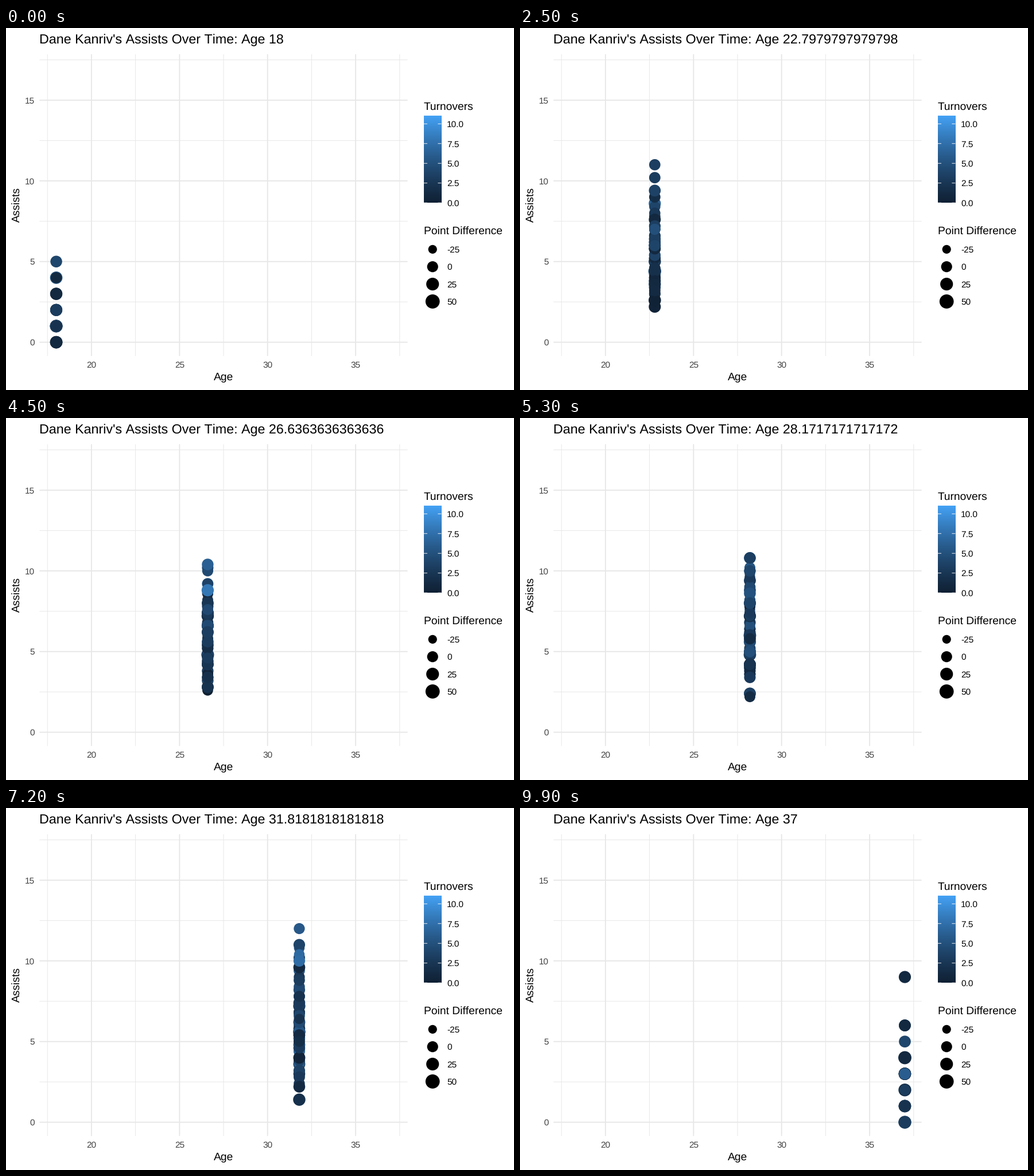
A matplotlib script for the animation above (10 s loop, 885x632 px).

```python
import numpy as np
import matplotlib.pyplot as plt
from matplotlib.animation import FuncAnimation

plt.rcParams.update({
    "font.family": "Liberation Sans",
    "text.hinting": "none",
    "text.kerning_factor": 6,
})

W, H, DPI = 885, 632, 100
PT = 72 / DPI
FRAMES, STEP = 100, 100
FIRST, LAST = 18, 37
LEFT, RIGHT, TOP, BOTTOM = 58.4, 699.6, 45.7, 572.6
BAR_L, BAR_R, BAR_T, BAR_B = 728, 758.4, 153.5, 305.2
GRID, TICK_TEXT = "#e7e7e7", "#424242"
LOW, HIGH = (19, 43, 67), (86, 177, 247)
GAMMA = 1.8

# Games per season; mean and best assists run between a few key ages
GAMES = [71, 79, 50, 66, 68, 80, 82, 65, 66, 80,
         77, 82, 82, 73, 82, 58, 78, 6, 35, 66]
AGES = np.arange(FIRST, LAST + 1)
KNOTS = [18, 20, 21, 24, 34, 36, 37]
MEANS = np.interp(AGES, KNOTS, [1.5, 3.8, 5.2, 5.8, 5.5, 5.6, 2.2])
BESTS = np.interp(AGES, KNOTS, [5, 8, 12, 12, 13, 17, 9]).astype(int)
KEYS = [round(k * (FRAMES - 1) / (LAST - FIRST)) for k in range(len(AGES))]


def px(age):
    return 148.9 + 30.68 * (np.asarray(age) - 20)


def py(assists):
    return 548.6 - 28.17 * np.asarray(assists)


def diameter(diff):
    share = np.clip((np.asarray(diff, float) + 48) / 100, 0, 1)
    return 6.2 + 18.7 * np.sqrt(share)


# --- colour ramp, blended in CIE Lab ---------------------------------------
TO_XYZ = np.array([[0.4124, 0.3576, 0.1805],
                   [0.2126, 0.7152, 0.0722],
                   [0.0193, 0.1192, 0.9505]])
WHITE = TO_XYZ.sum(axis=1)
TO_LAB = np.array([[0, 116, 0], [500, -500, 0], [0, 200, -200]])


def to_lab(rgb):
    c = np.array(rgb) / 255
    lin = np.where(c > 0.04045, ((c + 0.055) / 1.055) ** 2.4, c / 12.92)
    f = TO_XYZ @ lin / WHITE
    f = np.where(f > 0.008856, np.cbrt(f), 7.787 * f + 16 / 116)
    return TO_LAB @ f - [16, 0, 0]


def to_rgb(lab):
    fy = (lab[:, 0] + 16) / 116
    f = np.stack([fy + lab[:, 1] / 500, fy, fy - lab[:, 2] / 200], axis=1)
    xyz = np.where(f > 0.2069, f ** 3, (f - 16 / 116) / 7.787) * WHITE
    lin = np.clip(xyz @ np.linalg.inv(TO_XYZ).T, 0, 1)
    return lin ** (1 / GAMMA)


LAB_LOW, LAB_HIGH = to_lab(LOW), to_lab(HIGH)


def shade(turnovers):
    t = np.asarray(turnovers, float)[:, None] / 11
    return to_rgb(LAB_LOW + t * (LAB_HIGH - LAB_LOW))


# --- game data --------------------------------------------------------------
rng = np.random.default_rng(24)


def season(n, mean, best):
    """Rows of assists, turnovers and dot size for one age."""
    spread = np.sqrt(mean)
    low = max(0, round(mean - 2.1 * spread))
    high = min(best, int(mean + 3 * spread))
    usual = np.minimum(rng.poisson(mean, n), high)
    # one best game and at least one of every usual score
    assists = rng.permutation(np.r_[best, low:high + 1, usual][:n])
    turnovers = np.minimum(rng.poisson(1.2 + 0.28 * assists), 11)
    size = diameter(rng.normal(5, 9, n))
    return np.stack([assists, turnovers, size], axis=1)


data = [season(*args) for args in zip(GAMES, MEANS, BESTS)]


def state(i):
    """Ages and rows at step i; games without a partner wait in place."""
    k = np.searchsorted(KEYS, i, side="right") - 1
    a, age = data[k], AGES[k]
    if KEYS[k] == i:
        return np.full(len(a), age), a
    b = data[k + 1]
    t = (i - KEYS[k]) / (KEYS[k + 1] - KEYS[k])
    n = min(len(a), len(b))
    moved = a[:n] * (1 - t) + b[:n] * t
    ages = np.where(np.arange(len(a)) < n, age + t, age)
    return ages, np.vstack([moved, a[n:]])


# --- stage --------------------------------------------------------------------
fig = plt.figure(figsize=(W / 100, H / 100), dpi=DPI, facecolor="white")
ax = fig.add_axes([0, 0, 1, 1])
ax.axis("off")


def label(x, y, text, size, color="black", **kw):
    return ax.text(x, y, text, fontsize=size * PT, color=color,
                   va="baseline", **kw)


def line(xs, ys, width, color=GRID, z=1):
    ax.plot(xs, ys, color=color, lw=width * PT, solid_capstyle="butt",
            snap=False, zorder=z)


def grid(ages, assists, width):
    for y in py(assists):
        line([LEFT, RIGHT], [y, y], width)
    for x in px(ages):
        line([x, x], [TOP, BOTTOM], width)


grid(np.arange(17.5, 38, 5), np.arange(2.5, 18, 5), 0.95)
grid(np.arange(20, 36, 5), np.arange(0, 16, 5), 1.9)

for age in range(20, 36, 5):
    label(px(age), 592.6, str(age), 15.45, TICK_TEXT, ha="center")
for n in range(0, 16, 5):
    label(49.6, py(n) + 5.6, str(n), 15.45, TICK_TEXT, ha="right")
label(378.8, 615, "Age", 19.3, ha="center")
label(24, 309, "Assists", 19.3, ha="center", rotation=90,
      rotation_mode="anchor")
title = label(57.6, 27, "", 23.2)

# Colour bar
label(BAR_L, 142.6, "Turnovers", 19.3)
ramp = shade(np.linspace(11, 0, 300))[:, None, :]
ax.imshow(ramp, extent=(BAR_L, BAR_R, BAR_B, BAR_T), aspect="auto", zorder=1)
for v in np.arange(0, 11, 2.5):
    y = BAR_B - v / 11 * (BAR_B - BAR_T)
    line([BAR_L, BAR_L + 6], [y, y], 0.9, "white", 2)
    line([BAR_R - 6, BAR_R], [y, y], 0.9, "white", 2)
    label(768, y + 5.6, f"{v:.1f}", 15.45)

# Size key
label(BAR_L, 360.2, "Point Difference", 19.3)
for k, diff in enumerate((-25, 0, 25, 50)):
    y = 386.4 + 30.35 * k
    ax.add_patch(plt.Circle(((BAR_L + BAR_R) / 2, y), diameter(diff) / 2,
                            color="black", lw=0))
    label(768, y + 5.6, str(diff), 15.45)

dots = ax.scatter([], [], lw=0, zorder=3)
ax.set_xlim(0, W)
ax.set_ylim(H, 0)


def draw(i):
    ages, rows = state(i)
    dots.set_offsets(np.stack([px(ages), py(rows[:, 0])], axis=1))
    dots.set_sizes((rows[:, 2] * PT) ** 2)
    dots.set_facecolors(shade(rows[:, 1]))
    age = FIRST + (LAST - FIRST) * i / (FRAMES - 1)
    title.set_text(f"Dane Kanriv's Assists Over Time: Age {age:.15g}")
    return dots, title


anim = FuncAnimation(fig, draw, frames=FRAMES, interval=STEP, repeat=True)
plt.show()
```
